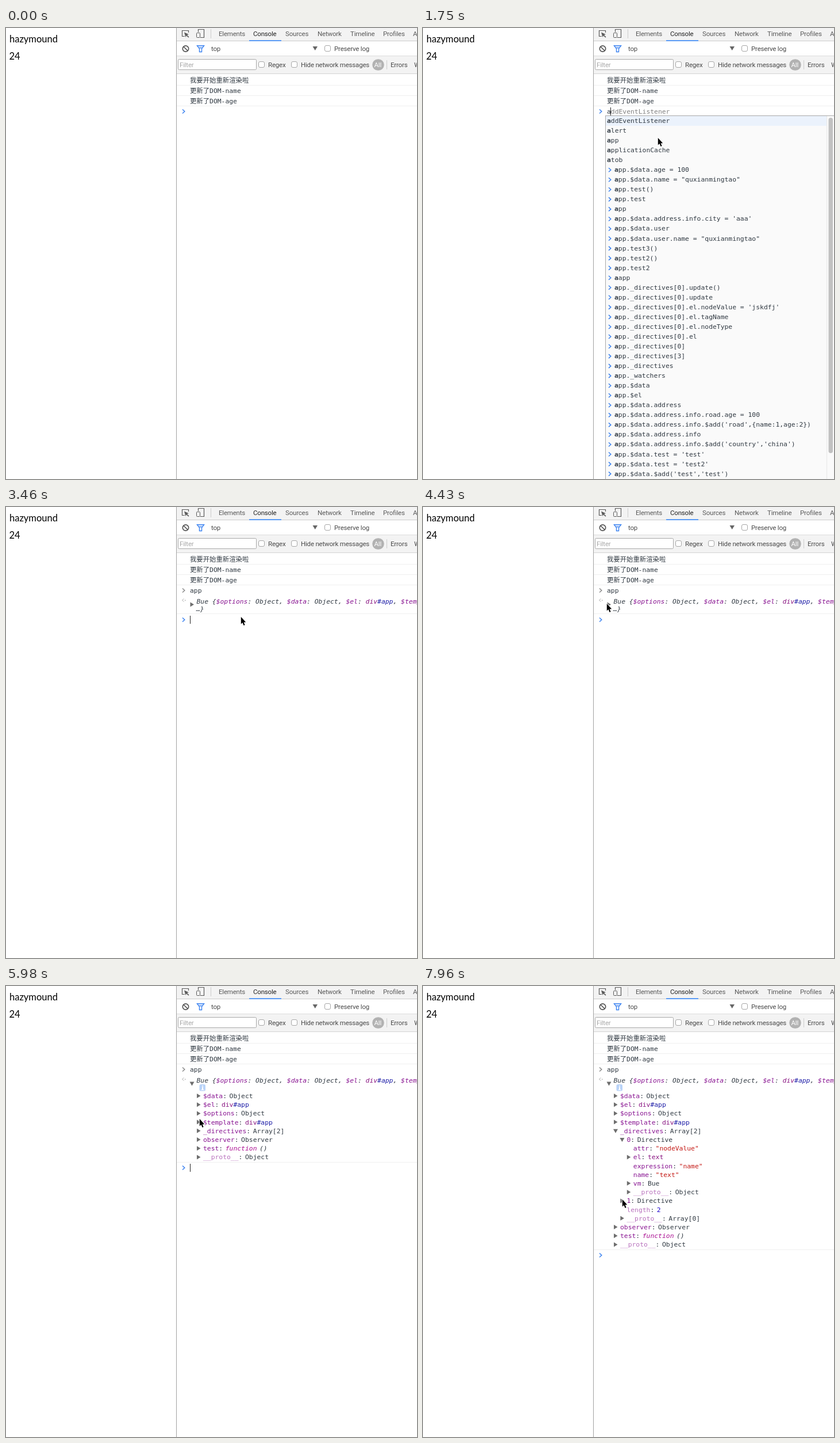
Animation of 715 by 784 pixels, one loop 7990 ms. Source, as an HTML page with a canvas:

```html
<!DOCTYPE html>
<html lang="en">
<head>
<meta charset="utf-8">
<title>Console session</title>
<style>
  html, body { margin: 0; width: 100%; height: 100%; overflow: hidden; background: #fff; }
  canvas { display: block; }
</style>
</head>
<body>
<canvas id="stage" width="715" height="784"></canvas>
<script>
const ctx = document.getElementById('stage').getContext('2d');
const LOOP = 7990;
const MONO = '11.36px "DejaVu Sans Mono", "Noto Sans CJK SC", "Noto Sans CJK", monospace';
const UI = '11.5px Roboto, "Liberation Sans", sans-serif';
const PAGE = '16.5px Lato, sans-serif';
const INK = '#303942', KEY = '#881391', TAG = '#881280', ID = '#1a1aa6',
      STR = '#c41a16', NUM = '#1c00cf', BLUE = '#3b82f0', GRAY = '#6e6e6e';

// Timeline (ms)
const EXPAND_ROOT = 4580, EXPAND_LIST = 6500, EXPAND_ITEM = 7190;
const CARET_ON = [[970, 1390], [1720, 2890], [3370, 3910], [4580, 5080], [5590, 6090], [6500, 7680]];
const MOVES = [ // start, end, from x, y, to x, y
  [380, 700, 720, 202, 408, 191],
  [3910, 4440, 408, 191, 319, 168],
  [4590, 5180, 319, 168, 335, 220],
  [5560, 5630, 335, 220, 336, 222],
  [5770, 6280, 336, 222, 336, 247],
  [6520, 7000, 336, 247, 344, 262],
  [7130, 7970, 344, 262, 346, 371]
];

const BUILTINS = ['addEventListener', 'alert', 'app', 'applicationCache', 'atob'];
const HISTORY = `app.$data.age = 100
app.$data.name = "quxianmingtao"
app.test()
app.test
app
app.$data.address.info.city = 'aaa'
app.$data.user
app.$data.user.name = "quxianmingtao"
app.test3()
app.test2()
app.test2
aapp
app._directives[0].update()
app._directives[0].update
app._directives[0].el.nodeValue = 'jskdfj'
app._directives[0].el.tagName
app._directives[0].el.nodeType
app._directives[0].el
app._directives[0]
app._directives[3]
app._directives
app._watchers
app.$data
app.$el
app.$data.address
app.$data.address.info.road.age = 100
app.$data.address.info.$add('road',{name:1,age:2})
app.$data.address.info
app.$data.address.info.$add('country','china')
app.$data.test = 'test'
app.$data.test = 'test2'
app.$data.$add('test','test')
app.$data.$add
app.$data.$observer.$add
app.$data.$observer.notify('added','test','test')
app.$data.notify('added','test','test')`.split('\n');

function rect(x, y, w, h, color) {
  ctx.fillStyle = color;
  ctx.fillRect(x, y, w, h);
}

function box(x, y, w, h, r, fill, stroke) {
  ctx.beginPath();
  ctx.roundRect(x, y, w, h, r);
  if (fill) { ctx.fillStyle = fill; ctx.fill(); }
  if (stroke) { ctx.strokeStyle = stroke; ctx.lineWidth = 1; ctx.stroke(); }
}

function path(points, close) {
  ctx.beginPath();
  for (let i = 0; i < points.length; i += 2) ctx.lineTo(points[i], points[i + 1]);
  if (close) ctx.closePath();
}

function line(points, color, width = 1, close = false) {
  path(points, close);
  ctx.strokeStyle = color;
  ctx.lineWidth = width;
  ctx.stroke();
}

function shape(points, color) {
  path(points, true);
  ctx.fillStyle = color;
  ctx.fill();
}

// Draws text around the vertical centre y and returns its right end.
function mono(str, x, y, color = INK, style = '') {
  ctx.font = `${style} ${MONO}`;
  ctx.fillStyle = color;
  ctx.fillText(str, x, y + 4);
  return x + ctx.measureText(str).width;
}

function label(str, x, y, color = '#4a4a4a') {
  ctx.font = UI;
  ctx.letterSpacing = '-0.2px';
  ctx.fillStyle = color;
  ctx.fillText(str, x, y + 4);
  ctx.letterSpacing = '0px';
}

function chevron(x, y, color) {
  line([x, y - 3.5, x + 3.8, y, x, y + 3.5], color, 1.5);
}

function arrow(x, y, open) {
  shape(open ? [x - 1, y - 3, x + 7, y - 3, x + 3, y + 4]
             : [x, y - 4, x + 6.5, y, x, y + 4], GRAY);
}

function checkbox(x, y) {
  box(x + .5, y + .5, 10, 10, 2.5, '#fff', '#a8a8a8');
}

function drawPage() {
  rect(0, 0, 715, 784, '#fff');
  ctx.font = PAGE;
  ctx.fillStyle = '#000';
  ctx.fillText('hazymound', 6, 25);
  ctx.fillText('24', 5.5, 55);
  rect(296, 0, 1, 784, '#a3a3a3');
}

function drawToolbars() {
  rect(297, 0, 418, 22, '#f3f3f3');
  rect(297, 22, 418, 1, '#ccc');
  rect(297, 48, 418, 1, '#ddd');
  rect(297, 49, 418, 30, '#f3f3f3');
  rect(297, 79, 418, 1, '#d4d4d4');

  line([311, 14.5, 306.5, 14.5, 306.5, 4.5, 317.5, 4.5, 317.5, 8], '#5a5a5a', 1.2);
  shape([310, 7.5, 318, 11, 315, 12, 318.5, 15.5, 317.3, 16.7, 314, 13.3, 312.5, 16], '#5a5a5a');
  line([334.5, 7, 334.5, 2.5, 344.5, 2.5, 344.5, 16.5, 338, 16.5], '#5a5a5a', 1.2);
  box(331.5, 8.5, 6, 8, 1, '#f3f3f3', '#5a5a5a');
  rect(356, 2, 1, 16, '#ccc');
  [['Elements', 370], ['Console', 430], ['Sources', 486], ['Network', 542],
   ['Timeline', 599], ['Profiles', 656], ['Application', 708]]
    .forEach(([name, x]) => label(name, x, 10, name === 'Console' ? '#222' : '#5a5a5a'));
  rect(423, 21, 56, 2, '#5b9bf5');

  ctx.beginPath();
  ctx.arc(312.5, 36, 5.2, 0, 7);
  ctx.strokeStyle = '#555';
  ctx.lineWidth = 1.7;
  ctx.stroke();
  line([309, 32.5, 316, 39.5], '#555', 1.7);
  line([332.5, 30.8, 344.5, 30.8, 340.5, 36, 340.5, 41.5, 336.5, 41.5, 336.5, 36], BLUE, 1.4, true);
  shape([335, 33, 342, 33, 339.5, 36, 337.5, 36], '#8db6f7');
  label('top', 357, 36);
  shape([533.5, 32, 542, 32, 537.7, 39], '#666');
  checkbox(554, 30);
  label('Preserve log', 571, 36);

  box(299.5, 54.5, 136, 18, 2, '#fff', '#a8a8a8');
  label('Filter', 302, 64, '#a9a9a9');
  checkbox(439, 58);
  label('Regex', 456, 64);
  checkbox(496, 58);
  label('Hide network messages', 513, 64);
  box(637.3, 54.3, 20.4, 19.4, 9.5, '#b2b2b2');
  label('All', 640.5, 64, '#fff');
  rect(662, 56, 1, 16, '#ccc');
  label('Errors', 669, 64);
  label('Warnings', 710, 64);
}

function drawLog() {
  ['我要开始重新渲染啦', '更新了DOM-name', '更新了DOM-age'].forEach((str, i) => {
    mono(str, 320, 91 + 18 * i);
    rect(297, 99 + 18 * i, 418, 1, '#f0f0f0');
  });
}

function caret(t, x, y) {
  if (CARET_ON.some(([a, b]) => t >= a && t < b)) rect(Math.round(x), y - 7, 1, 14, '#222');
}

function drawPopup(typed) {
  const match = s => s.startsWith(typed);
  const words = BUILTINS.filter(match);
  const rows = words.concat(HISTORY.filter(match));
  const scrolls = rows.length > 37;
  const pitch = 17.045;

  rect(317, 152, 398, 632, '#a9a9a9');
  rect(318, 153, 397, 631, '#fafafa');
  rect(318, 153, 397, 17, '#ebf2fc');
  rows.forEach((row, i) => {
    const y = 161 + pitch * i, old = i >= words.length;
    if (old) chevron(323, y + .5, BLUE);
    const x = mono(typed, old ? 333 : 320, y, INK, 'bold');
    mono(row.slice(typed.length), x, y);
  });
  if (scrolls) {
    rect(702, 153, 13, 631, '#fafafa');
    rect(702, 153, 1, 631, '#e8e8e8');
    box(705.5, 156, 7.5, 583, 3.75, '#c1c1c1');
  }
}

function drawPrompt(t) {
  const typed = 'app'.slice(0, t < 1720 ? 0 : t < 2170 ? 1 : t < 2380 ? 2 : 3);
  chevron(307, 145, BLUE);
  const x = mono(typed, 320, 145);
  if (typed && t >= 1750 && t < 3370) {
    mono((typed === 'a' ? 'addEventListener' : 'app').slice(typed.length), x, 145, '#808080');
    drawPopup(typed);
  }
  caret(t, x - (typed ? .4 : 0), 145);
}

// Tree rows: depth, key, value runs, arrow state (0 none, 1 closed, 2 open)
function treeRows(t) {
  const obj = s => [[s, INK]];
  const div = [['div', TAG], ['#app', ID]];
  const list = t >= EXPAND_LIST, item = t >= EXPAND_ITEM;
  return [
    [0, '$data', obj('Object'), 1],
    [0, '$el', div, 1],
    [0, '$options', obj('Object'), 1],
    [0, '$template', div, 1],
    [0, '_directives', obj('Array[2]'), list ? 2 : 1],
    ...(list ? [[1, '0', obj('Directive'), item ? 2 : 1]] : []),
    ...(item ? [
      [2, 'attr', [['"nodeValue"', STR]], 0],
      [2, 'el', [['text', TAG]], 1],
      [2, 'expression', [['"name"', STR]], 0],
      [2, 'name', [['"text"', STR]], 0],
      [2, 'vm', obj('Bue'), 1],
      [2, '__proto__', obj('Object'), 1]
    ] : []),
    ...(list ? [
      [1, '1', obj('Directive'), 1],
      [1, 'length', [['2', NUM]], 0],
      [1, '__proto__', obj('Array[0]'), 1]
    ] : []),
    [0, 'observer', obj('Observer'), 1],
    [0, 'test', [['function', '#aa0d91', 'italic'], ['()', INK, 'italic', 4.5]], 1],
    [0, '__proto__', obj('Object'), 1]
  ];
}

function drawTree(t) {
  let y = 191;
  for (const [depth, key, runs, state] of treeRows(t)) {
    const x = 343 + 11.4 * depth;
    if (state) arrow(x - 11, y, state === 2);
    const dim = key === '__proto__' || key === 'length';
    const end = mono(key, x, y, dim ? '#b871bd' : KEY);
    mono(':', end, y);
    let pen = end + 11.4;
    for (const [str, color, style, gap = 0] of runs) pen = mono(str, pen + gap, y, color, style);
    y += 15.2;
  }
  return y - 15.2;
}

function drawResult(t) {
  const open = t >= EXPAND_ROOT;
  chevron(307, 145, '#8a8a8a');
  mono('app', 320, 145);
  line([309.5, 159.5, 306.5, 162, 309.5, 164.5], '#b0b0b0');
  rect(311, 161.5, 1.5, 1.5, '#b0b0b0');

  let x = 331.5;
  const put = (str, color) => { x = mono(str, x, 164, color, 'italic'); };
  put('Bue {');
  for (const [key, tag] of [['$options'], ['$data'], ['$el', 1], ['$template', 1]]) {
    put(key, KEY);
    put(': ');
    if (tag) { put('div', TAG); put('#app', ID); } else put('Object');
    put(', ');
  }
  arrow(320.5, 169.5, open);

  let last = 176.5;
  if (open) {
    box(336.5, 171, 10.5, 11.5, 2.5, '#b9d3f8');
    rect(341, 173, 2, 1.5, '#fff');
    rect(341, 175.5, 2, 5, '#fff');
    rect(339.5, 180, 5, 1, '#fff');
    last = drawTree(t);
  } else {
    mono('…}', 331, 177, INK, 'italic');
  }
  rect(297, Math.round(last + 8.6), 418, 1, '#f0f0f0');
  const y = Math.round(last + 19);
  chevron(307, y, BLUE);
  caret(t, 320, y);
}

function drawMouse(t) {
  const move = MOVES.filter(m => t >= m[0]).pop();
  if (!move) return;
  const [start, end, x0, y0, x1, y1] = move;
  const p = Math.min(1, (t - start) / (end - start));
  const k = start === 380 ? 1 - (1 - p) ** 2 : p * p * (3 - 2 * p);
  ctx.save();
  ctx.translate(Math.round(x0 + (x1 - x0) * k), Math.round(y0 + (y1 - y0) * k));
  const outline = [.8, 0, .8, 12.6, 3.5, 10.1, 5.6, 15, 7.6, 14.1, 5.6, 9.4, 9.2, 9.2];
  line(outline, '#fff', 1.8, true);
  shape(outline, '#000');
  ctx.restore();
}

function frame(now) {
  const t = now % LOOP;
  drawPage();
  drawToolbars();
  drawLog();
  if (t < 3430) drawPrompt(t);
  else drawResult(t);
  drawMouse(t);
  requestAnimationFrame(frame);
}
requestAnimationFrame(frame);
</script>
</body>
</html>
```
